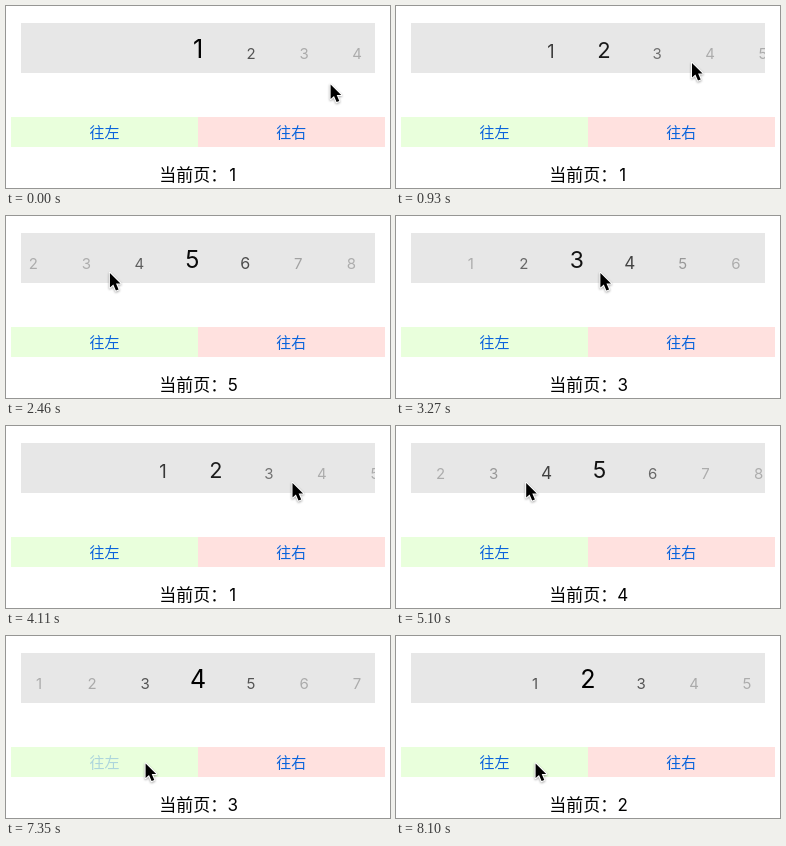
Recreate the animation shown at these times as an HTML page. Size 384 by 182 pixels, loop 8.13 s.

```html
<!DOCTYPE html>
<html lang="zh-CN">
<head>
<meta charset="utf-8">
<style>
  html, body { margin: 0; width: 100%; height: 100%; overflow: hidden; background: #fff; }
  svg { display: block; width: 384px; height: 182px; }
  text { font-family: Inter, "Noto Sans CJK SC", "Noto Sans CJK", sans-serif; text-anchor: middle; }
  .button { font-size: 15px; fill: #0b64dc; }
  .label { font-size: 17px; }
  #items { font-size: 15px; }
  #cursor { filter: drop-shadow(0 1px 1px rgba(0, 0, 0, .35)); }
</style>
</head>
<body>
<svg viewBox="0 0 384 182">
  <clipPath id="strip"><rect x="15" y="17" width="354" height="50"/></clipPath>
  <rect x="15" y="17" width="354" height="50" fill="#e7e7e7"/>
  <g clip-path="url(#strip)"><g id="items"></g></g>
  <rect x="5" y="111" width="187" height="30" fill="#e9ffdc"/>
  <rect x="192" y="111" width="187" height="30" fill="#ffe1df"/>
  <text id="left" class="button" x="98.5" y="131.6">往左</text>
  <text id="right" class="button" x="285.3" y="131.6">往右</text>
  <text class="label" x="187.3" y="174.8">当前页：</text>
  <text id="page" class="label" x="226.8" y="174.8"></text>
  <path id="cursor" d="M0 0V14.6L3.4 11.5L6 17.6L8.7 16.4L6.1 10.5H10.6Z" fill="#000" stroke="#fff" stroke-width="2" stroke-linejoin="round" paint-order="stroke"/>
</svg>
<script>
const LOOP = 8130, COUNT = 9, GAP = 53, CENTER = 192, SLIDE = 300;
const $ = id => document.getElementById(id);
const clamp = v => Math.min(1, Math.max(0, v));
const ramp = (t, start, end) => {
  const p = clamp((t - start) / (end - start));
  return p * p * (3 - 2 * p);
};
const mix = (a, b, p) => a + (b - a) * p;

// Each swing eases the strip from where the last one left it
const swings = [
  { start: 345, end: 2595, to: 5.15 },
  { start: 2595, end: 3950, to: 1.26 },
  { start: 3950, end: 4770, to: 5.26 },
  { start: 4980, end: 5560, to: 1 }
];
const swipe = t => swings.reduce((page, s) => mix(page, s.to, ramp(t, s.start, s.end)), 1);

const repeat = (count, start, gap) => Array.from({ length: count }, (_, i) => start + i * gap);
const rightTaps = repeat(3, 6055, 330);
const leftTaps = repeat(2, 7345, 415);
const slid = (taps, t) => taps.reduce((sum, start) => sum + ramp(t, start, start + SLIDE), 0);

// A pressed title dims at once, then fades back after release
function titleOpacity(taps, t) {
  const tap = taps.find(start => t >= start - 80 && t < start + SLIDE);
  return tap ? mix(0.25, 1, clamp((t - tap) / SLIDE)) : 1;
}

// The pointer holds the strip while swiping, then visits both buttons
function pointerAt(t) {
  const lift = ramp(t, 30, 300), toRight = ramp(t, 5760, 6020), toLeft = ramp(t, 7040, 7310);
  const grip = 377 + 14 * lift - 17 * ramp(t, 480, 1650) + 9 * ramp(t, 4110, 4980);
  const held = grip - GAP * swipe(t);
  const x = mix(mix(held, 276, toRight), 139, toLeft);
  const y = mix(mix(78, 56.5, lift), 127, toRight);
  return [x + 0.6, y + 0.5];
}

const items = Array.from({ length: COUNT }, (_, i) => {
  const el = document.createElementNS("http://www.w3.org/2000/svg", "text");
  el.textContent = i + 1;
  el.setAttribute("y", 5.45);
  return $("items").appendChild(el);
});

function draw(t) {
  const page = swipe(t) + slid(rightTaps, t) - slid(leftTaps, t);
  items.forEach((el, i) => {
    const offset = i + 1 - page, dist = Math.abs(offset), near = clamp(1 - dist);
    el.setAttribute("transform",
      `translate(${CENTER + offset * GAP} ${47.4 - 5 * near}) scale(${1 + 0.67 * near})`);
    el.setAttribute("opacity", Math.max(0.25, 1 - 0.37 * dist));
  });
  $("page").textContent = Math.floor(page + 1e-6);
  $("left").setAttribute("opacity", titleOpacity(leftTaps, t));
  $("right").setAttribute("opacity", titleOpacity(rightTaps, t));
  $("cursor").setAttribute("transform", `translate(${pointerAt(t)})`);
}

const begin = performance.now();
function tick() {
  draw((performance.now() - begin) % LOOP);
  requestAnimationFrame(tick);
}
tick();
</script>
</body>
</html>
```
